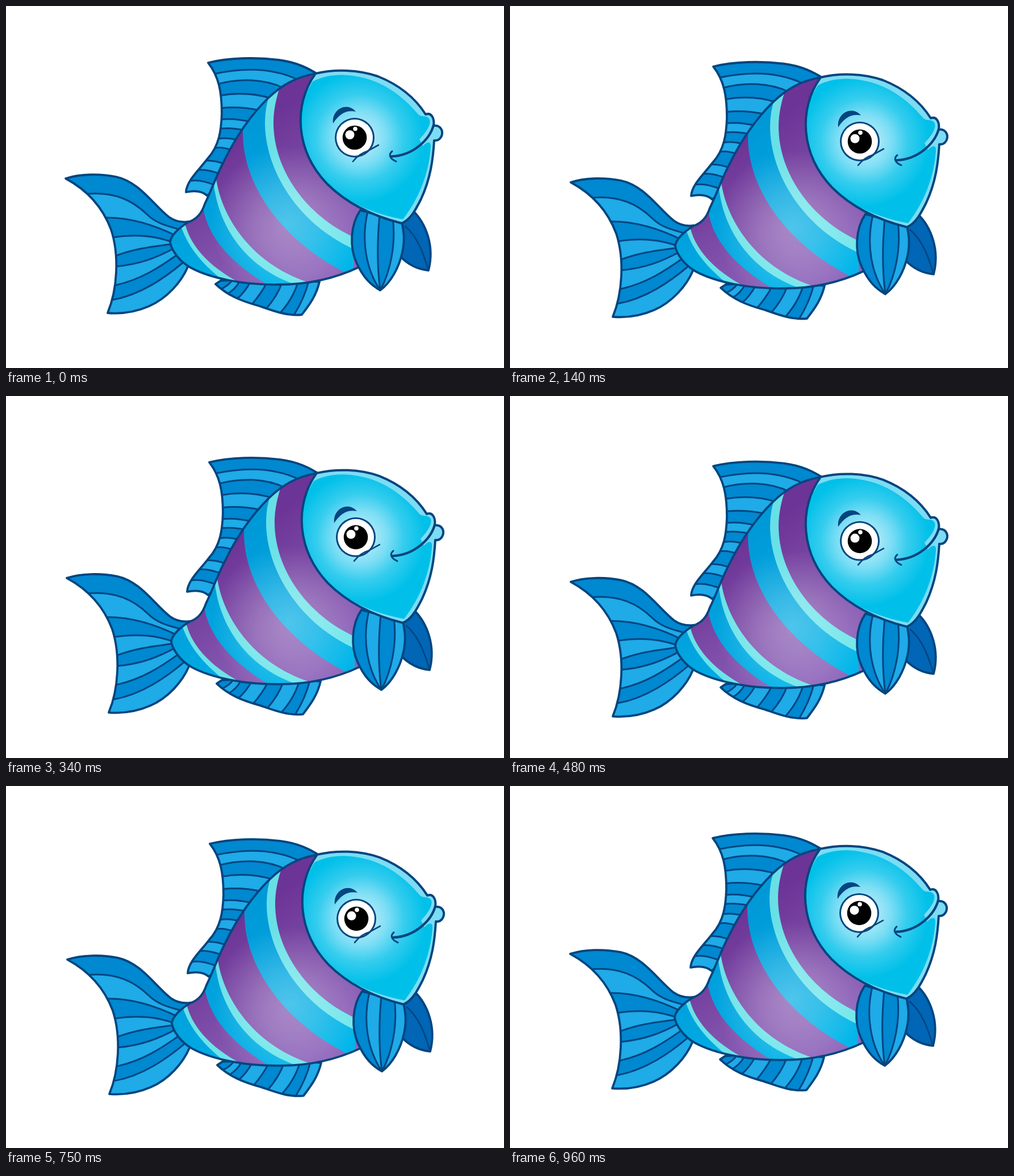
These frames come from a looping animation (877 by 638 pixels, 1.03 s). An HTML page with a canvas:

```html
<!DOCTYPE html>
<html lang="en">
<head>
<meta charset="utf-8">
<title>Fish</title>
<style>
html, body { margin: 0; width: 100%; height: 100%; overflow: hidden; background: #fff; }
canvas { display: block; }
</style>
</head>
<body>
<canvas id="stage" width="877" height="638"></canvas>
<script>
const ctx = document.getElementById('stage').getContext('2d');
const LINE = '#05457f', DEEP = '#0088d0', SKY = '#1faae8';
const LOOP = 1030;
const STEPS = [0, 70, 140, 200, 270, 340, 410, 480, 610, 680, 750, 820, 890, 960];

function fill(d, style) {
  ctx.fillStyle = style;
  ctx.fill(new Path2D(d));
}

function stroke(d, width = 3.8) {
  ctx.strokeStyle = LINE;
  ctx.lineWidth = width;
  ctx.stroke(new Path2D(d));
}

function disc(x, y, r, style) {
  ctx.beginPath();
  ctx.arc(x, y, r, 0, Math.PI * 2);
  ctx.fillStyle = style;
  ctx.fill();
}

function ramp(gradient, ...stops) {
  stops.forEach(([at, color]) => gradient.addColorStop(at, color));
  return gradient;
}

// Fills a shape with bands; each edge starts the next colour, `close` wraps the far side.
function bands(outline, edges, close, colors, inked = true) {
  ctx.save();
  ctx.clip(new Path2D(outline));
  fill(outline, colors[0]);
  edges.forEach((edge, i) => fill(edge + close, colors[(i + 1) % colors.length]));
  if (inked) edges.forEach(edge => stroke(edge, 3));
  ctx.restore();
}

const BELOW = 'H900V700H0Z', RIGHT = 'V700H900V0Z', BODY_RIGHT = 'V700H900V0H300Z';

const tail = {
  outline: 'M105 304C130 296 164 295 194 301C235 310 259 350 287 372C297 379 308 382 322 380L335 425L320 460C309 486 284 515 252 529C227 540 204 543 179 541C196 500 200 440 185 394C170 354 144 325 105 304Z',
  edges: [
    'M143 331C192 327 223 343 248 367C265 384 285 388 310 395',
    'M173 373C220 372 262 386 302 406',
    'M188 408C232 401 265 406 296 417',
    'M194 440C232 426 262 424 296 419',
    'M194 459C238 455 268 442 296 427',
    'M193 492C238 482 271 460 302 438',
    'M187 518C238 509 281 478 312 452'
  ]
};

const dorsal = {
  outline: 'M356 100C392 91 440 90 480 95C512 99 533 110 550 121L480 200L400 300L354 334C345 326 332 325 317 328C318 308 340 289 355 269C376 246 379 218 380 190C380 152 375 124 356 100Z',
  edges: [
    'M365 120C415 109 468 108 514 130',
    'M371 138C412 127 455 128 490 145',
    'M376 158C408 152 438 154 468 163',
    'M378 180C402 177 424 179 448 184',
    'M378 200C398 198 414 200 434 205',
    'M378 216Q398 214 420 219',
    'M374 234Q390 231 410 237',
    'M368 250Q382 248 400 255',
    'M350 273Q364 271 386 279',
    'M338 289Q354 287 380 297',
    'M326 308Q342 305 372 317'
  ]
};

const anal = {
  outline: 'M369 490L378 484L460 480L552 486C546 512 533 528 521 544C495 547 470 537 447 529C414 520 390 510 369 490Z',
  edges: [
    'M398 484Q390 494 378 499',
    'M411 486Q404 499 389 508',
    'M430 487Q421 504 406 517',
    'M459 488Q450 506 432 527',
    'M486 488Q478 511 457 535',
    'M514 487Q505 517 481 543',
    'M533 485Q525 517 505 548'
  ]
};

const frontFin = {
  outline: 'M624 360C606 386 605 425 617 452C629 479 643 492 659 501C678 487 692 461 698 434C703 411 700 396 697 380Z',
  edges: [
    'M637 362C625 413 634 464 659 501',
    'M658 368C653 420 654 464 659 501',
    'M681 373C687 420 677 468 659 501'
  ]
};

const BACK_FIN = 'M716 360C740 383 755 424 744 466C725 464 708 456 694 441L694 385Z';

const BODY = 'M546 119C510 125 485 140 462 162C425 198 400 240 383 275C370 300 364 320 350 349C344 367 335 376 321 381C303 392 290 405 289 416C291 430 305 450 325 461C360 480 420 492 480 491C530 491 580 480 622 460L660 430V370Z';
const STRIPES = [
  'M306 380C316 420 345 455 384 485',
  'M314 378C322 420 355 458 412 488',
  'M346 345C350 400 390 450 465 494',
  'M365 304C370 380 417 462 516 493',
  'M369 296C376 368 432 460 546 491',
  'M418 205C408 300 475 410 606 474',
  'M466 150Q456 178 456 205C456 290 515 385 614 429',
  'M484 138Q471 175 471 205C471 290 530 370 612 407'
];

const GILL = 'M545 119C505 175 510 255 565 313C600 348 645 370 697 383';
const HEAD = GILL + 'C713 376 722 358 731 340C748 303 752 270 754 237C764 238 769 229 768 221C766 213 760 210 753 211C755 198 749 187 739 191C720 161 690 138 655 124C620 112 580 111 545 119Z';
const FACE = 'M540 133C562 121 592 119 617 124C664 132 698 158 726 191C732 197 741 191 746 200C749 211 738 224 728 235L734 247C740 240 749 236 748 249C745 293 728 339 699 376C645 366 600 346 565 313C510 255 507 185 540 133Z';

function drawFins() {
  bands(tail.outline, tail.edges, BELOW, [DEEP, SKY]);
  stroke(tail.outline);
  bands(dorsal.outline, dorsal.edges, BELOW, [DEEP, SKY]);
  stroke(dorsal.outline);
  bands(anal.outline, anal.edges, RIGHT, [DEEP, SKY]);
  stroke(anal.outline);
  fill(BACK_FIN, '#0066b5');
  stroke('M703 388C724 406 735 435 744 466', 2.6);
  stroke(BACK_FIN);
}

function drawBody() {
  const slant = () => ctx.createLinearGradient(400, 240, 550, 460);
  const blue = ramp(slant(), [0, '#0099d8'], [1, '#00b5e9']);
  const teal = ramp(slant(), [0, '#68dfe6'], [1, '#6ee6ea']);
  const purple = ramp(slant(), [0, '#6c3496'], [1, '#8f66bb']);
  bands(BODY, STRIPES, BODY_RIGHT, [blue, teal, purple], false);
  const glow = ramp(ctx.createRadialGradient(495, 382, 0, 495, 382, 135),
    [0, 'rgba(255,255,255,.31)'], [.4, 'rgba(255,255,255,.21)'], [1, 'rgba(255,255,255,0)']);
  fill(BODY, glow);
  stroke(BODY);
}

function drawHead() {
  const halo = alpha => `rgba(205,241,252,${alpha})`;
  fill(HEAD, '#7cdcf3');
  fill(FACE, '#00c0e9');
  fill(FACE, ramp(ctx.createRadialGradient(622, 232, 20, 622, 232, 115),
    [0, halo(.85)], [.3, halo(.6)], [.6, halo(.26)], [1, halo(0)]));
  stroke(HEAD, 4);
  stroke('M753 210C746 236 716 264 679 265', 4.2);
  stroke('M680 256C673 262 676 269 687 274', 3);
}

function drawEye() {
  disc(614, 232, 35, LINE);
  disc(614, 232, 32, '#fff');
  disc(614, 232, 21.3, '#000');
  disc(605.5, 227, 8, '#fff');
  disc(615, 216.5, 3.8, '#fff');
  stroke('M611 274Q622 260 636 256Q645 251 656 245', 2.6);
  fill('M576 207C573 182 600 168 616 186C599 183 587 190 576 207Z', LINE);
}

function drawFish() {
  drawFins();
  drawBody();
  bands(frontFin.outline, frontFin.edges, RIGHT, [DEEP, SKY]);
  stroke(frontFin.outline);
  drawHead();
  drawEye();
}

// Steady sink, a quick hop up, then a steady rise.
function offset(i) {
  return i < 8
    ? [Math.min(2, i), 3.37 * i]
    : [Math.min(3, 3 - (i - 10) * .67), 8.5 - 3.32 * (i - 8)];
}

function render(now) {
  const t = now % LOOP;
  const step = STEPS.filter(start => start <= t).length - 1;
  ctx.setTransform(1, 0, 0, 1, 0, 0);
  ctx.fillStyle = '#fff';
  ctx.fillRect(0, 0, 877, 638);
  ctx.lineJoin = ctx.lineCap = 'round';
  ctx.translate(...offset(step));
  drawFish();
}

const begin = performance.now();
function tick() {
  render(performance.now() - begin);
  requestAnimationFrame(tick);
}
tick();
</script>
</body>
</html>
```
